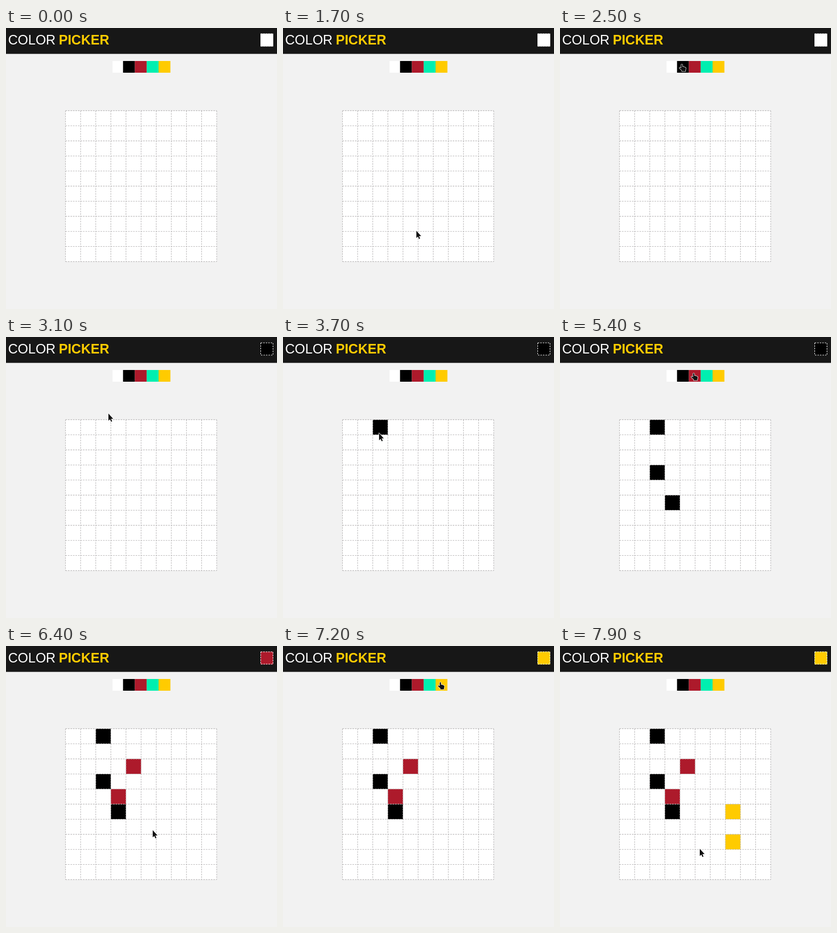
Recreate the animation shown at these times as an HTML page with a canvas. Size 508x528 px, loop 8 s.

```html
<!DOCTYPE html>
<html lang="en">
<head>
<meta charset="utf-8">
<style>
  html, body { margin: 0; width: 508px; height: 528px; overflow: hidden; background: #f2f2f2; }
  canvas { display: block; }
</style>
</head>
<body>
<canvas id="stage" width="508" height="528"></canvas>
<script>
const ctx = document.getElementById('stage').getContext('2d');
const LOOP = 8000, STEP = 100, CELL = 28.35, CELLS = 10, LEFT = 111.5, TOP = 155.4;
const SWATCH = 22.2, PALETTE_X = 197.2, PALETTE_Y = 62;
const colors = ['#fff', '#000', '#ad1a2b', '#00efb0', '#ffcb00'];

const colX = col => LEFT + CELL * col;
const rowY = row => TOP + CELL * row;

// Each stop: where the pointer arrives, how long it rests, and what its click does.
const move = (at, x, y) => ({ at, x, y, rest: 0 });
const pick = (at, color) => ({ at, x: PALETTE_X + SWATCH * color + 9, y: 68, rest: 200, color });
const paint = (at, col, row) => ({ at, x: colX(col) + 11, y: rowY(row) + 15, rest: 100, col, row });

const stops = [
  move(1700, 250, 381),
  pick(2500, 1), paint(3300, 2, 0), move(3700, 180, 180.5), paint(4100, 2, 3), move(4400, 194, 284), paint(4500, 3, 5),
  pick(5400, 2), paint(5900, 4, 2), paint(6100, 3, 4), move(6400, 275, 346),
  pick(7000, 4), paint(7500, 7, 5), paint(7700, 7, 7), move(7900, 262, 381)
];

const arrow = new Path2D('M0 0V13.5L3 11 5 15.5 7 14.6 5 10H9Z');
const hand = new Path2D('M-1.2 1Q0 -.8 1.2 1V5Q3 4 4 5.5Q5.5 5 6 6.3Q7.5 6 7.5 8L6.5 13.5H0V11.5L-4.5 7.5Q-4.5 5.5 -2.5 6.5L-1.2 7.5Z');

function rect(x, y, w, h, color) {
  ctx.fillStyle = color;
  ctx.fillRect(x, y, w, h);
}

function text(string, x, weight, color) {
  ctx.font = `${weight} 25px "Liberation Sans", Arial, sans-serif`;
  ctx.fillStyle = color;
  ctx.fillText(string, x, 30.5);
}

function dashedBox(x, y, size, color) {
  ctx.setLineDash([2.8, 1.9]);
  ctx.lineWidth = 1;
  ctx.strokeStyle = color;
  ctx.strokeRect(x, y, size, size);
}

function drawGrid(painted) {
  const size = CELL * CELLS;
  rect(LEFT, TOP, size, size, '#fff');
  for (const { col, row, color } of painted) rect(colX(col), rowY(row), CELL, CELL, color);

  ctx.strokeStyle = '#b9b7b8';
  ctx.lineWidth = 1.1;
  ctx.setLineDash([2.8, 1.9]);
  ctx.beginPath();
  for (let i = 0; i <= CELLS; i++) {
    ctx.moveTo(colX(i), TOP);
    ctx.lineTo(colX(i), TOP + size);
    ctx.moveTo(LEFT, rowY(i));
    ctx.lineTo(LEFT + size, rowY(i));
  }
  ctx.stroke();
}

function pointerAt(t) {
  const next = stops.findIndex(stop => stop.at > t);
  if (next === 0) return null;
  const from = stops.at(next - 1 < 0 ? -1 : next - 1);
  if (next < 0) return from;
  const to = stops[next], start = from.at + from.rest;
  const k = Math.max(0, (t - start) / (to.at - start));
  const eased = k * k * (3 - 2 * k);
  return { x: from.x + (to.x - from.x) * eased, y: from.y + (to.y - from.y) * eased };
}

function drawPointer({ x, y }) {
  const overPalette = x > 200 && x < 308 && y > PALETTE_Y && y < PALETTE_Y + 22;
  const shape = overPalette ? hand : arrow;
  ctx.save();
  ctx.translate(x, y);
  ctx.setLineDash([]);
  ctx.lineJoin = 'round';
  ctx.lineWidth = 1.4;
  ctx.strokeStyle = '#fff';
  ctx.stroke(shape);
  ctx.fillStyle = '#111';
  ctx.fill(shape);
  ctx.restore();
}

function frame(now) {
  const t = Math.floor(now % LOOP / STEP) * STEP;
  let current = colors[0];
  const painted = [];
  for (const stop of stops) {
    if (stop.at + stop.rest > t) break;
    if ('color' in stop) current = colors[stop.color];
    if ('col' in stop) painted.push({ ...stop, color: current });
  }

  rect(0, 0, 508, 528, '#f2f2f2');
  rect(0, 0, 508, 48.6, '#171717');
  text('COLOR', 4, 'normal', '#fff');
  text('PICKER', 99, 'bold', colors[4]);
  rect(477, 10.6, 24, 24, current);
  dashedBox(477.5, 11, 23, '#fff');
  colors.forEach((color, i) => {
    const x = PALETTE_X + SWATCH * i, inset = i ? 0 : 2.5;
    rect(x + inset, PALETTE_Y, SWATCH - inset, 22, color);
  });
  drawGrid(painted);
  const pointer = pointerAt(t);
  if (pointer) drawPointer(pointer);
  requestAnimationFrame(frame);
}
requestAnimationFrame(frame);
</script>
</body>
</html>
```
